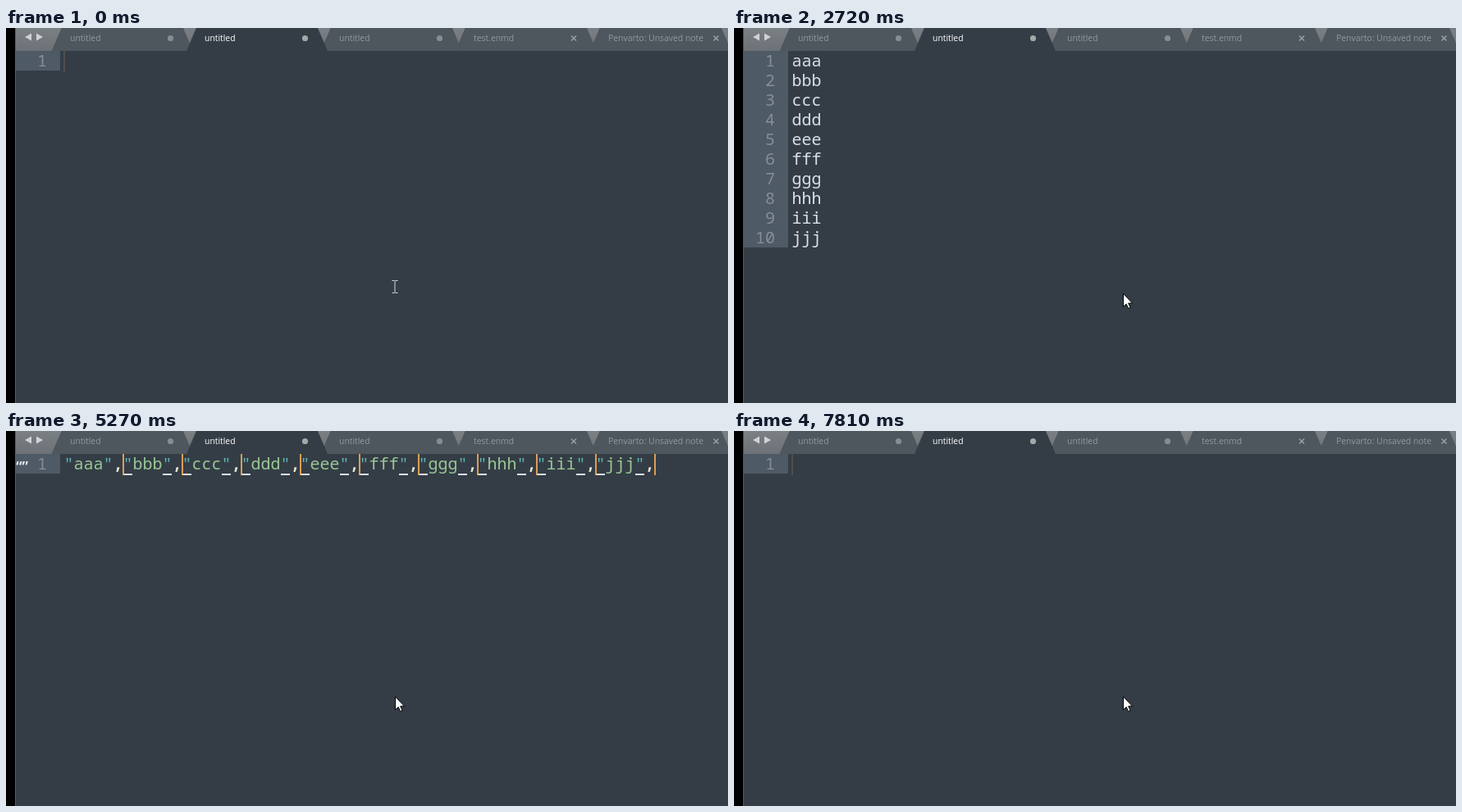
These frames come from a looping animation (880x458 px, 8 s). An HTML page:

```html
<!DOCTYPE html>
<html lang="en">
<head>
<meta charset="utf-8">
<title>Multiple carets</title>
<style>
  html, body { margin: 0; width: 100%; height: 100%; overflow: hidden; background: #343d46; }
  svg { display: block; width: 880px; height: 458px; }
  .tab { font: 10.4px "Open Sans", "Noto Sans", sans-serif; fill: #929a9f; }
  .tab.active { fill: #fff; font-weight: 500; }
  .code { font: 500 20px "Noto Sans Mono", "DejaVu Sans Mono", monospace; white-space: pre; }
  .comma { font-weight: 700; }
  .num { font-weight: 400; fill: #848e98; text-anchor: end; }
  .icon { font: bold 17px "Noto Sans", sans-serif; fill: #dfe5ea; }
</style>
</head>
<body>
<svg viewBox="0 0 880 458">
  <defs>
    <linearGradient id="bar" x1="0" y1="0" x2="0" y2="1">
      <stop offset="0" stop-color="#7b8084"/>
      <stop offset="1" stop-color="#6c7277"/>
    </linearGradient>
  </defs>
  <rect width="880" height="458" fill="#343d46"/>
  <rect x="11" width="869" height="28" fill="url(#bar)"/>
  <g id="tabs"></g>
  <path d="M31 6.5V15.5L23 11ZM37 6.5V15.5L45 11Z" fill="#cfd3d5"/>
  <rect width="11" height="458" fill="#000"/>
  <rect x="11" width="1" height="458" fill="#1b6aa5"/>
  <g id="editor"></g>
  <g id="carets" fill="#f9ae58"></g>
  <g id="mouse"></g>
</svg>
<script>
const LOOP = 8000, LEFT = 70, TOP = 28, CHAR = 12, LINE = 24;
const $ = id => document.getElementById(id);
const colX = col => LEFT + col * CHAR;
const rowY = row => TOP + row * LINE;
const last = (list, t) => list.filter(e => e.at <= t).pop();

const words = [...'abcdefghij'].map(c => c.repeat(3));
const wrap = (before, after) => words.map(w => before + w + after);
const everyRow = col => words.map((_, row) => [row, col]);
const joined = wrap('"', '",').join('');
const trimmed = joined.slice(0, -1);

// Each edit restarts the caret blink.
const scenes = [
  { at: 0, rows: [''], carets: [[0, 0]] },
  { at: 210, rows: [''], carets: [[0, 0]] },
  { at: 460, rows: words, carets: [[9, 3]] },
  { at: 910, rows: words, carets: [[9, 3]], select: 'block' },
  { at: 1590, rows: words, carets: everyRow(3), select: 'rows' },
  { at: 2170, rows: words, carets: everyRow(0) },
  { at: 2920, rows: wrap('"', ''), carets: everyRow(1) },
  { at: 3400, rows: wrap('"', ''), carets: everyRow(4) },
  { at: 3840, rows: wrap('"', '"'), carets: everyRow(5) },
  { at: 4330, rows: wrap('"', '",'), carets: everyRow(6) },
  { at: 4900, rows: [joined], carets: words.map((_, i) => [0, 6 * i + 6]) },
  { at: 5700, rows: [joined], carets: [[0, 60]] },
  { at: 6260, rows: [trimmed], carets: [[0, 59]] },
  { at: 6570, rows: [trimmed], carets: [[0, 59]], select: 'rows' },
  { at: 7240, rows: [''], carets: [[0, 0]] }
];

// Quote highlighting lags behind the edits.
const pairs = from => words.slice(from).flatMap((_, i) => [6 * (i + from), 6 * (i + from) + 4]);
const marks = [
  { at: 0, cols: [] },
  { at: 3100, cols: [0], icon: row => row % 2 ? '”' : '“' },
  { at: 4090, cols: [0, 4], icon: () => '“”' },
  { at: 4580, cols: [] },
  { at: 5080, cols: pairs(1), icon: () => '“”' },
  { at: 5700, cols: [] },
  { at: 6570, cols: pairs(9), icon: () => '“”' },
  { at: 7240, cols: [0], icon: () => '“”' },
  { at: 7560, cols: [] }
];

const fades = [-100, 1340, 1960, 2540, 3280, 3770, 4260, 4770, 5270, 6070, 6950, 7690];

const pointer = [
  { at: 0, x: 474, y: 316, beam: true },
  { at: 1395, x: 471.5, y: 315.5 },
  { at: 1650, x: 472.5, y: 319.5 },
  { at: 1710, x: 474.5, y: 324.5, busy: true },
  { at: 1960, x: 474.5, y: 324.5 }
];

function drawTabs() {
  const names = ['untitled', 'untitled', 'untitled', 'test.enmd', 'Penvarto: Unsaved note'];
  const tab = i => {
    const x = 56 + 164 * i, active = i === 1;
    const tone = active ? '#a3a9a9' : '#868d91';
    const shape = `M${x} 28L${x + 12} 0H${x + 160}L${x + 172} 28Z`;
    const cx = i === 4 ? 865.5 : x + (i === 3 ? 144 : 144.5);
    const button = i < 3
      ? `<circle cx="${cx}" cy="12.5" r="3.6" fill="${tone}"/>`
      : `<path d="M${cx - 3} 9.5l6 6m0 -6l-6 6" stroke="#9aa0a4" stroke-width="1.5"/>`;
    return `<path d="${shape}" fill="${active ? '#343d46' : '#4e565e'}"/>` +
      `<path d="M${x} 28L${x + 12} 0" stroke="#465058" stroke-opacity=".6"/>` +
      `<text class="tab${active ? ' active' : ''}" x="${x + 22}" y="16">${names[i]}</text>${button}`;
  };
  $('tabs').innerHTML = [4, 3, 2, 0, 1].map(tab).join('');
}

function highlight(rows) {
  let inString = false;
  return rows.map(row => [...row].map(c => {
    if (c === ',') return '<tspan class="comma" fill="#e4e2d4">,</tspan>';
    let fill = inString ? '#99c794' : '#d8dee9';
    if (c === '"') {
      inString = !inString;
      fill = '#5fb4b4';
    }
    return `<tspan fill="${fill}">${c}</tspan>`;
  }).join(''));
}

function selection({ select, rows }) {
  const style = 'fill="#4b5964" stroke="#687886" stroke-width="1"';
  if (select === 'block') {
    const x = colX(3), bottom = rowY(9);
    return `<path d="M70.5 28.5H${x + CHAR}V${bottom}H${x}V${bottom + LINE}H70.5Z" stroke-linejoin="round" ${style}/>`;
  }
  if (select !== 'rows') return '';
  return rows.map((row, i) =>
    `<rect x="70.5" y="${rowY(i) + .5}" width="${row.length * CHAR - .5}" height="${LINE}" rx="3" ${style}/>`).join('');
}

function drawEditor(scene, mark) {
  const active = new Set(scene.carets.map(c => c[0]));
  const code = highlight(scene.rows);
  const gutter = scene.rows.map((_, i) => active.has(i)
    ? `<rect x="12" y="${rowY(i)}" width="54" height="${LINE}" fill="#4e5a65"/>` : '').join('');
  const text = code.map((line, i) => {
    const y = rowY(i), base = y + 19;
    const lines = mark.cols.map(c =>
      `<rect x="${colX(c) + 1}" y="${y + LINE}" width="11" height="2" fill="#d8dee9"/>`).join('');
    const icon = mark.icon
      ? `<text class="icon" x="${mark.icon(i).length > 1 ? 12 : 15.5}" y="${y + 22}">${mark.icon(i)}</text>` : '';
    return `<text class="code num" x="50" y="${base}">${i + 1}</text>` +
      `<text class="code" x="70.5" y="${base}">${line}</text>${lines}${icon}`;
  }).join('');
  $('editor').innerHTML = gutter + selection(scene) + text;
  $('carets').innerHTML = scene.carets.map(([row, col]) =>
    `<rect x="${colX(col)}" y="${rowY(row)}" width="2" height="26"/>`).join('');
}

function caretAlpha(t, start) {
  const fade = fades.filter(f => f <= t).pop();
  if (start > 0 && fade < start) return 1;
  if (t >= 7810) return .15;
  const age = t - fade;
  return age < 70 ? .85 : age < 130 ? .15 : 0;
}

function drawMouse({ x, y, beam, busy }, t) {
  if (beam) {
    return `<path d="M${x - 3.5} ${y - 7.5}h3m1 0h3m-3.5 0v15m-3.5 0h3m1 0h3" fill="none" stroke="#d5d8da"/>`;
  }
  const ring = busy
    ? `<g transform="translate(${x + 14.5} ${y}) rotate(${Math.floor(t / 60) * 40})" fill="none" stroke-width="2.5">` +
      '<circle r="4.8" stroke="#3a8fc8"/><path d="M0 -4.8A4.8 4.8 0 0 1 4.8 0" stroke="#a5dcf5"/></g>' : '';
  return `<path transform="translate(${x} ${y})" d="M0 0V16L3.7 12.6L6.2 18L8.6 17L6.2 11.6H11Z" ` +
    `fill="#fff" stroke="#000" stroke-width="1"/>${ring}`;
}

let shownScene, shownMark;
function render(t) {
  const scene = last(scenes, t), mark = last(marks, t);
  if (scene !== shownScene || mark !== shownMark) {
    drawEditor(scene, mark);
    shownScene = scene;
    shownMark = mark;
  }
  $('carets').setAttribute('opacity', caretAlpha(t, scene.at));
  $('mouse').innerHTML = drawMouse(last(pointer, t), t);
}

drawTabs();
render(0);
const begin = performance.now();
function tick() {
  render((performance.now() - begin) % LOOP);
  requestAnimationFrame(tick);
}
requestAnimationFrame(tick);
</script>
</body>
</html>
```
